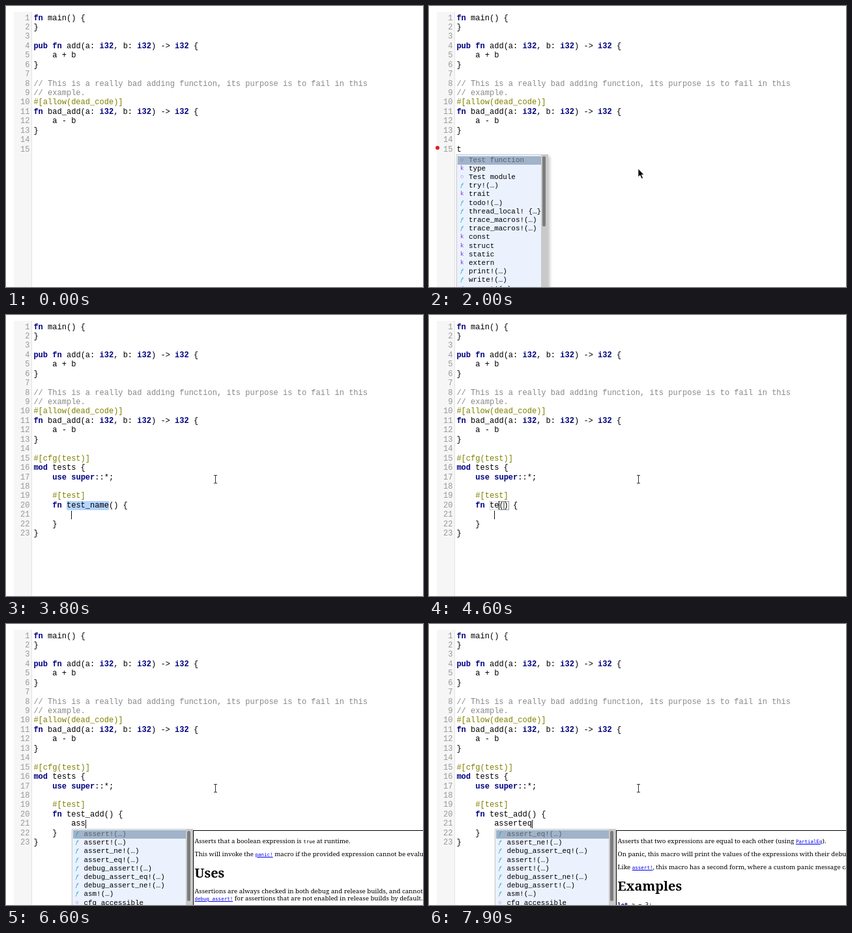
An HTML page that plays this animation: 640 by 432 pixels, repeating every 8 s.

```html
<!DOCTYPE html>
<html lang="en">
<head>
<meta charset="utf-8">
<title>Code completion</title>
<style>
html, body { margin: 0; width: 100%; height: 100%; overflow: hidden; background: #fff; }
#stage { position: relative; width: 640px; height: 432px; overflow: hidden; font: 12.04px/14.44px "Liberation Mono", monospace; color: #000; }
#stage * { position: absolute; white-space: pre; box-sizing: border-box; }
#stage span, #stage b, #stage u { position: static; }
.gutter { left: 12px; top: 9px; width: 28px; height: 423px; background: #f6f6f6; border-right: 1px solid #e4e4e4; }
.nums { right: 603.5px; top: 11.5px; text-align: right; color: #999; }
.code { left: 42.4px; top: 11.5px; }
.code b, .doc b { color: #000080; }
.rem { color: #888; }
.attr { color: #808000; }
.dot { left: 10px; top: 215px; width: 6px; height: 6px; border-radius: 50%; background: #e02020; }
.bar { width: 1px; height: 13px; background: #111; }
.bracket { width: 8px; height: 14px; border: 1px solid #999; }
.field { height: 14px; border: 1px dotted #bbb; }
.picked { height: 14px; background: #b5d5ff; }
.popup { height: 300px; background: #ebf2fe; border: 1px solid #ccc; box-shadow: 2px 3px 5px rgba(0,0,0,.25); font-size: 10.9px; line-height: 13.2px; }
.row { left: 1px; right: 10px; height: 13.2px; overflow: hidden; }
.row.on { background: #a0b3c9; color: #59606e; }
.row i, .row em { left: 4px; font-size: 9px; font-style: normal; color: #7a38d8; }
.row em { color: #18a5c5; font-style: italic; }
.row span { margin-left: 17px; }
.track { right: 0; top: 0; width: 10px; height: 100%; background: #c9c9c9; }
.thumb { right: 3px; top: 2px; width: 5px; height: 108px; border-radius: 3px; background: #7c7c7c; }
.doc { background: #fff; border: 1px solid #000; overflow: hidden; font: 9.7px/12px "Noto Serif", serif; }
.doc > div { left: 1.5px; }
.doc h1 { position: static; margin: 0; font-size: 20px; line-height: 12px; }
.doc u, .doc span { font: 7.5px "DejaVu Sans Mono", monospace; }
.doc u { color: #0000ee; }
svg { overflow: visible; }
</style>
</head>
<body>
<div id="stage"></div>
<script>
const LOOP = 8000, stage = document.getElementById('stage');
const CHAR = 7.225, LINE = 14.44;
const colX = c => 42.4 + c * CHAR, lineY = n => 11.5 + (n - 1) * LINE;

// Key times in ms
const CLICK = 550, ACCEPT = 3650, TAB = 5550;
const HINT = [1250, 2250];
const NAME = [4250, 4450, 4650, 4750, 4850, 5050, 5250, 5450];
const CALL = [6250, 6450, 6550, 6750, 6850, 7150, 7450, 7650];
const KEYS = [CLICK, ...HINT, ACCEPT, ...NAME, TAB, ...CALL];

const BASE = `fn main() {
}

pub fn add(a: i32, b: i32) -> i32 {
    a + b
}

// This is a really bad adding function, its purpose is to fail in this
// example.
#[allow(dead_code)]
fn bad_add(a: i32, b: i32) -> i32 {
    a - b
}

`;
const tests = (name, call) => `#[cfg(test)]
mod tests {
    use super::*;

    #[test]
    fn ${name}() {
        ${call}
    }
}`;

// Kind prefix: k keyword, f macro, o snippet
const LISTS = {
  t: 'oTest function,ktype,oTest module,ftry!(…),ktrait,ftodo!(…),fthread_local! {…},ftrace_macros!(…),ftrace_macros!(…),kconst,kstruct,kstatic,kextern,fprint!(…),fwrite!(…),fconcat!(…)',
  tm: 'ftrace_macros!(…),ftrace_macros!(…),oTest module,ktrait,ktype,oTest function,fthread_local! {…},ftry!(…),ftodo!(…),kimpl,kenum,kstruct,kmod,kconst,kstatic,kextern',
  assert: 'fassert!(…),fassert!(…),fassert_ne!(…),fassert_eq!(…),fdebug_assert!(…),fdebug_assert_eq!(…),fdebug_assert_ne!(…),fasm!(…),ocfg_accessible',
  asserteq: 'fassert_eq!(…),fassert_ne!(…),fdebug_assert_eq!(…),fassert!(…),fassert!(…),fdebug_assert_ne!(…),fdebug_assert!(…),fasm!(…),ocfg_accessible'
};
// Pairs of line centre and text
const DOCS = {
  trace: [[17, 'Enables or disables tracing functionality used for debugging other macros.']],
  assert: [
    [17, 'Asserts that a boolean expression is <span>true</span> at runtime.'],
    [37, 'This will invoke the <u>panic!</u> macro if the provided expression cannot be evaluated to <span>true</span>.'],
    [66, '<h1>Uses</h1>'],
    [94, 'Assertions are always checked in both debug and release builds, and cannot be disabled. See'],
    [105, '<u>debug_assert!</u> for assertions that are not enabled in release builds by default.']],
  asserteq: [
    [17, 'Asserts that two expressions are equal to each other (using <u>PartialEq</u>).'],
    [37, 'On panic, this macro will print the values of the expressions with their debug representations.'],
    [57, 'Like <u>assert!</u>, this macro has a second form, where a custom panic message can be provided.'],
    [86, '<h1>Examples</h1>'],
    [115, '<span style="font-size:8.8px"><b>let</b> a = 3;</span>']]
};

const typed = (word, times, t) => word.slice(0, times.filter(k => k <= t).length);
const box = (cls, x, y, w, body = '', h) =>
  `<div class="${cls}" style="left:${x}px;top:${y}px;${w ? `width:${w}px;` : ''}${h ? `height:${h}px` : ''}">${body}</div>`;
const bar = (col, line) => box('bar', Math.round(colX(col)), lineY(line) + .5);

function paint(line) {
  if (line.startsWith('//')) return `<span class="rem">${line}</span>`;
  if (/^\s*#/.test(line)) return `<span class="attr">${line}</span>`;
  return line.replace(/>/g, '&gt;').replace(/\b(fn|pub|mod|use|super|i32)\b/g, '<b>$1</b>');
}

function popup(x, y, w, list, sel) {
  const rows = list.split(',').map((item, i) => {
    const icon = { k: '<i>k</i>', f: '<em>ƒ</em>', o: '<i style="opacity:.8">○</i>' }[item[0]];
    return `<div class="row${i === sel ? ' on' : ''}" style="top:${1.5 + i * 13.2}px">${icon}<span>${item.slice(1)}</span></div>`;
  });
  return box('popup', x, y, w, rows.join('') + '<div class="track"></div><div class="thumb"></div>');
}

const doc = (x, y, w, h, lines) =>
  box('doc', x, y, w, lines.map(([c, s]) => `<div style="top:${c - 7}px">${s}</div>`).join(''), h);

function mouse(t) {
  if (t < 50) return '';
  const k = Math.min(1, (t - 50) / 500), p = k * (2 - k);
  const x = 638 - 317.5 * p, y = 428 - 178 * p;
  const shape = t < ACCEPT
    ? '<path d="M0 0V13L3 10.3L5.2 15.5L7.5 14.5L5.3 9.5H9Z" fill="#000" stroke="#fff" stroke-width=".8"/>'
    : '<path d="M-2 -3.5H3M-2 8.5H3M.5 -3.5V8.5" fill="none" stroke="#333"/>';
  return `<svg width="10" height="17" style="left:${x}px;top:${y}px">${shape}</svg>`;
}

function scene(t) {
  const inserted = t >= ACCEPT;
  const hint = typed('tm', HINT, t), call = typed('asserteq', CALL, t);
  const name = t < NAME[0] ? 'test_name' : typed('test_add', NAME, t);
  const lines = (BASE + (inserted ? tests(name, call) : hint)).split('\n');
  const last = KEYS.filter(k => k <= t).pop();
  const lit = t >= CLICK && (t - last) % 1000 < 500;
  const inName = inserted && t < TAB, end = 7 + name.length;
  let html = '<div class="gutter"></div>' +
    `<div class="nums">${lines.map((_, i) => i + 1).join('\n')}</div>`;

  if (inName) {
    const y = lineY(20), w = name.length * CHAR;
    html += t < NAME[0]
      ? box('picked', colX(7), y, w)
      : box('field', colX(7), y, w) +
        box('bracket', colX(end), y) + box('bracket', colX(end + 1), y);
    html += bar(8, 21);
  }
  html += `<div class="code">${lines.map(paint).join('\n')}</div>`;
  if (lit) {
    if (!inserted) html += bar(hint.length, 15);
    else if (!inName) html += bar(8 + call.length, 21);
    else if (t >= NAME[0]) html += bar(end, 20);
  }

  if (!inserted && t >= 1350) {
    const wide = hint === 'tm';
    const sel = !wide || t < 3150 ? 0 : t < 3400 ? 1 : 2;
    html += '<div class="dot"></div>' + popup(42, 228, wide ? 187 : 141, LISTS[hint], sel);
    if (wide && sel < 2) html += doc(229, 231 + sel * 13.2, 349, 34, DOCS.trace);
  }
  if (call && t >= 6350) {
    const key = call.length > 6 ? 'asserteq' : 'assert';
    html += popup(100.5, 314.5, 186.5, LISTS[key], 0) + doc(287, 317, 420, 200, DOCS[key]);
  }
  return html + mouse(t);
}

let shown;
function frame() {
  const html = scene(performance.now() % LOOP);
  if (html !== shown) stage.innerHTML = shown = html;
  requestAnimationFrame(frame);
}
frame();
</script>
</body>
</html>
```
